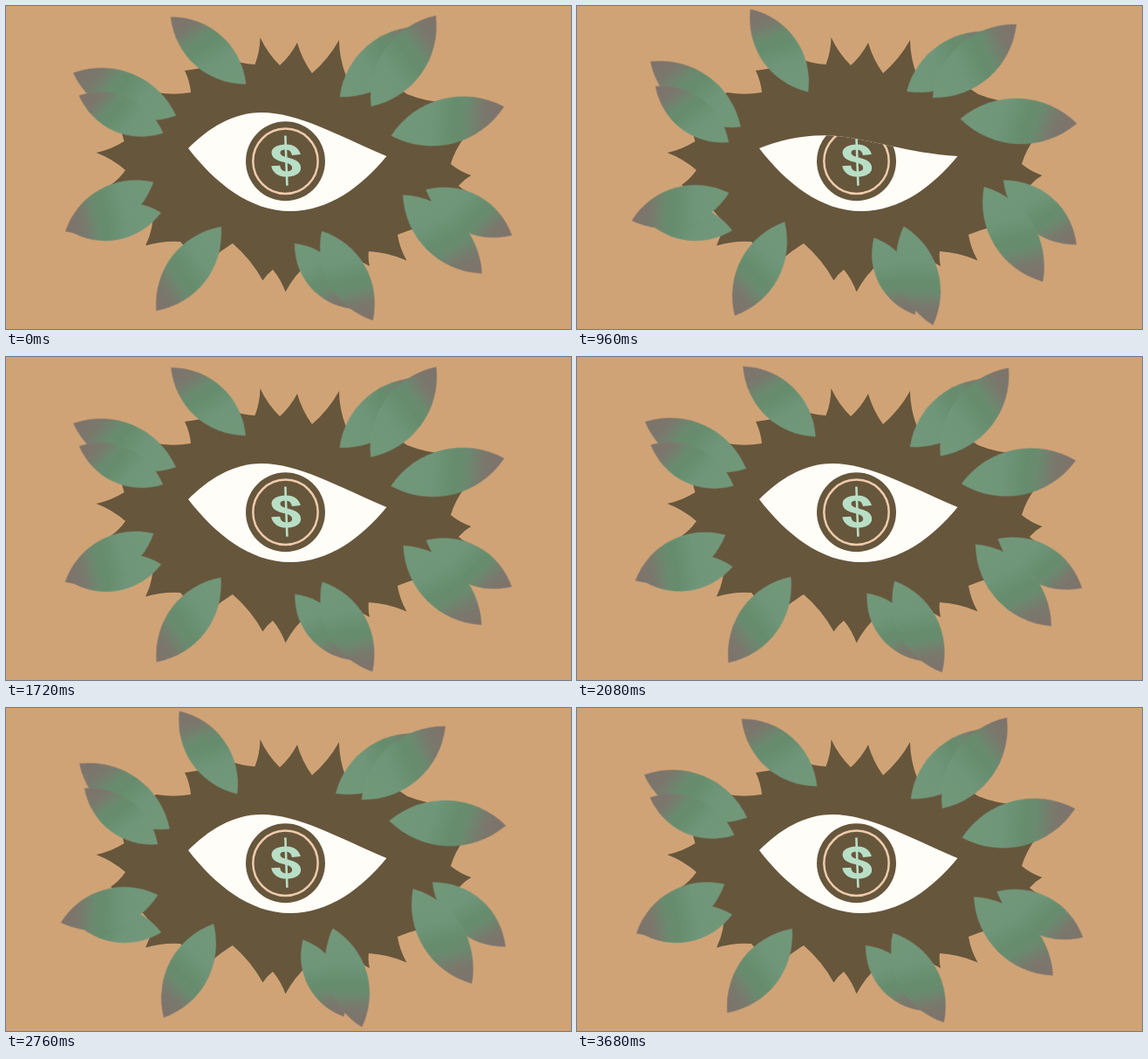
An HTML page for the animation above (3.84 s loop, 648 by 370 pixels).

```html
<!DOCTYPE html>
<html lang="en">
<head>
<meta charset="utf-8">
<title>Eye among leaves</title>
<style>
  html, body { margin: 0; width: 100%; height: 100%; overflow: hidden; background: #d0a376; }
  svg { position: absolute; left: 0; top: 0; width: 648px; height: 370px; }

  .leaf, .eye { animation: sway 3840ms infinite cubic-bezier(.364, 0, .636, 1); }
  .leaf { transform-origin: 0 0; }
  @keyframes sway {
    0%, 47.917%, 95.833%, 100% { transform: rotate(var(--from)); }
    23.958%, 70.833% { transform: rotate(var(--to)); }
  }

  .eye { animation-name: blink; }
  @keyframes blink {
    0%, 32.4%, 100% {
      clip-path: path("M209 163C232 140 260 122 293 122C335 122 380 148 436.5 172C408 207 370 235 326 235C280 235 240 203 209 163Z");
    }
    15.625% {
      clip-path: path("M209 163C232 174 262 182.7 293 187.4C335 195 380 199.2 436.5 172C408 207 370 235 326 235C280 235 240 203 209 163Z");
    }
  }
</style>
</head>
<body>
<svg viewBox="0 0 648 370">
  <defs>
    <linearGradient id="skin" x2="1" y2=".12">
      <stop offset="0" stop-color="#729879"/>
      <stop offset=".4" stop-color="#70967a"/>
      <stop offset=".62" stop-color="#668c6d"/>
      <stop offset=".7" stop-color="#698b6f"/>
      <stop offset=".86" stop-color="#7a786c"/>
      <stop offset="1" stop-color="#7e736b"/>
    </linearGradient>
  </defs>
  <path id="burst" fill="#66563c"/>
  <g id="leaves"></g>
</svg>
<svg class="eye" viewBox="0 0 648 370">
  <rect x="200" y="110" width="245" height="135" fill="#fffdf8"/>
</svg>
<svg class="eye" viewBox="0 0 648 370">
  <circle cx="320.5" cy="177.8" r="45.5" fill="#66563c"/>
  <circle cx="320.5" cy="177.8" r="37.2" fill="none" stroke="#efcbac" stroke-width="2.5"/>
  <g transform="translate(321.2 177)" fill="none" stroke="#b8dfc6">
    <path transform="scale(1.6 1)" stroke-width="6.2"
      d="M7.3 -6.5C6.5 -12.5 3.5 -15.5 0 -15.5C-4.5 -15.5 -7.3 -13 -7.3 -9C-7.3 1.5 7.5 -3 7.5 8.5C7.5 13 4.5 15.5 0 15.5C-3.500 15.5 -6.8 12.5 -7.5 6"/>
    <path stroke-width="2.6" d="M-.8 -28.5L1.2 28.7"/>
  </g>
</svg>
<script>
  // Burst: key corners, clockwise, joined by edges that all bow inward alike.
  const corners = `291.5,36 314,68 334,42 351,77 382,39 390,80 425,70 460,101 508,111 526,150
    510,181 533.5,194 519,206 530,213 500,250 449,262 459.5,291.5 416,281 417,298 385,286 347,294
    320.5,327.5 306,302 294.5,314.5 260,272 222,304 200,270 160,274.5 168,248 120,205
    137,188 103.5,168 135.5,155 125,130 172,99 212,99 205,74 255,60 285.5,67`
    .split(/\s+/).map(p => p.split(",").map(Number));

  const edge = ([x, y], i) => {
    const [nx, ny] = corners[(i + 1) % corners.length];
    const bow = .09;
    return `Q${(x + nx) / 2 - (ny - y) * bow} ${(y + ny) / 2 + (nx - x) * bow} ${nx} ${ny}`;
  };
  document.getElementById("burst").setAttribute("d", `M${corners[0]}${corners.map(edge).join("")}Z`);

  // One leaf shape, scaled to its half length and rocked about its centre.
  const leaf = (x, y, angle, size, swing = 13.4) => {
    const bend = size * .42, width = size * .52;
    return `<g transform="translate(${x} ${y})">
      <path class="leaf" fill="url(#skin)" style="--from:${angle}deg;--to:${angle + swing}deg"
        d="M${-size} 0C${-bend} ${-width} ${bend} ${-width} ${size} 0C${bend} ${width} ${-bend} ${width} ${-size} 0Z"/>
    </g>`;
  };

  document.getElementById("leaves").innerHTML = [
    leaf(232, 51, 221.7, 58),
    leaf(136, 101, 202.5, 64),
    leaf(132, 124, 204, 53),
    leaf(430, 64, -40.4, 62, 7.3),
    leaf(456, 63, -54.5, 64),
    leaf(506.5, 132, -14.4, 67, 16.8),
    leaf(531, 236.5, 28, 56),
    leaf(500.5, 261.5, 44.8, 64),
    leaf(364, 309.5, 48.6, 50),
    leaf(391.5, 309, 60.2, 59),
    leaf(209.5, 301, 127.7, 61, -9.7),
    leaf(125, 247, 169, 54, 22),
    leaf(118.5, 230, 150.8, 58)
  ].join("");
</script>
</body>
</html>
```
